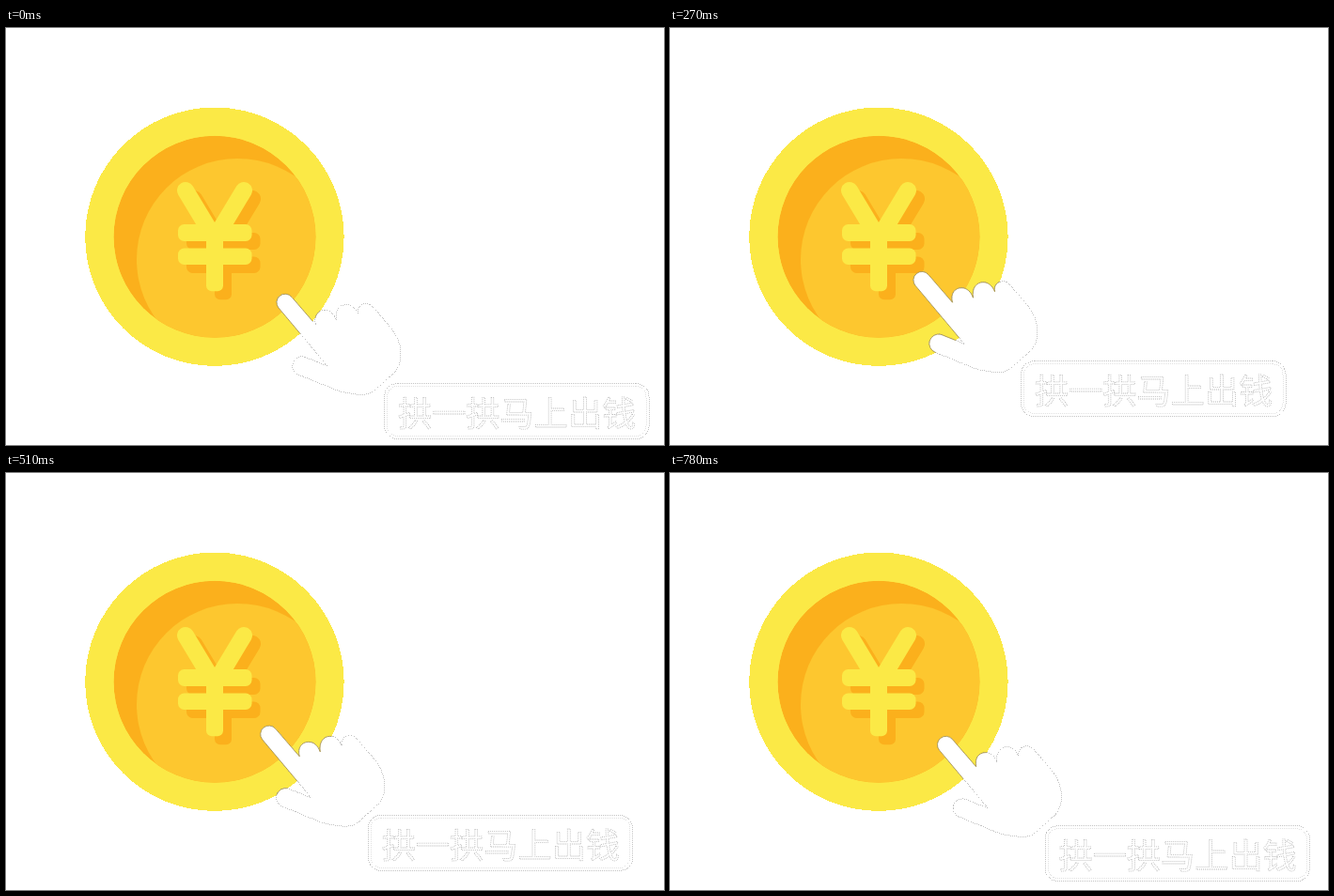
Write an HTML page that moves like this. It is 700 by 444 pixels and loops after 810 ms.

```html
<!DOCTYPE html>
<html lang="zh">
<head>
<meta charset="utf-8">
<style>
  html, body { margin: 0; width: 100%; height: 100%; overflow: hidden; background: #fff; }
  svg { display: block; width: 100vw; height: 100vh; }
  .dots { fill: none; stroke: #b4b4b4; stroke-width: .8; stroke-dasharray: 1 1; shape-rendering: crispEdges; }
  text { font: 500 36.2px "Noto Sans CJK SC", "Noto Sans CJK", sans-serif; }
</style>
</head>
<body>
<svg viewBox="0 0 700 444" xmlns="http://www.w3.org/2000/svg">
  <defs>
    <clipPath id="face"><circle cx="222" cy="222.3" r="107.5"/></clipPath>
    <clipPath id="rim"><circle cx="221.9" cy="222.2" r="137.7"/></clipPath>
    <g id="yen">
      <path d="M191 173 L222 224.5 L253 173" fill="none" stroke="currentColor"
            stroke-width="18" stroke-linecap="round" stroke-linejoin="round"/>
      <g fill="currentColor">
        <rect x="213" y="209" width="18" height="71.3" rx="6"/>
        <rect x="183" y="209" width="78.5" height="18" rx="6.5"/>
        <rect x="183" y="234.5" width="78.5" height="17.5" rx="6.5"/>
      </g>
    </g>
    <path id="hand" d="M290 298 A9 9 0 0 1 304 286.5 L329.5 316
      C327 306.5 332 300.5 339 300.5 C345 300.5 349 304.5 351.5 311
      C350 300.5 355 294.5 362 294.5 C368 294.5 372 298.5 374.5 304.5
      C373 297.5 378 293.5 383 293.5 C386 293.5 388 294.5 390.5 297
      L410 320 C416 328 420 337 420 347 C420 355 418 362 413 367
      L393 385 C388 390 381 391 373 390 C365 389 358 388 350 385
      L311 369 A10 10 0 0 1 317 350 L342 360 Z"/>
  </defs>

  <circle cx="221.9" cy="222.2" r="137.7" fill="#fbe946" shape-rendering="crispEdges"/>
  <g clip-path="url(#face)">
    <circle cx="222" cy="222.3" r="107.5" fill="#fbb01c"/>
    <circle cx="246.5" cy="246.5" r="107.5" fill="#fdc72f"/>
  </g>
  <use href="#yen" x="9" y="9" color="#fbb01c"/>
  <use href="#yen" color="#fbe946"/>

  <g class="move">
    <use href="#hand" fill="#fff"/>
    <use href="#hand" class="dots"/>
    <rect class="dots" x="402.5" y="378.5" width="281.5" height="59" rx="14"/>
    <rect class="dots" x="405.5" y="381.5" width="275.5" height="53" rx="11" opacity=".5"/>
    <text class="dots" x="417" y="424">拱一拱马上出钱</text>
  </g>
  <g clip-path="url(#rim)">
    <g class="move">
      <use href="#hand" fill="#fff" stroke="#a08a3c" stroke-width=".8"/>
    </g>
  </g>
</svg>
<script>
  const LOOP = 810, STEP = 30, REACH = 29, PEAK = 8;
  const movers = document.querySelectorAll('.move');
  // way back: [step, distance left]
  const back = [[PEAK, REACH], [14, 20], [18, 14.5], [22, 9], [25, 3.5]];

  function pull(i) {
    if (i <= PEAK) return REACH * (i / PEAK) ** 1.475;
    const k = back.findIndex(p => p[0] >= i);
    const [a, u] = back[k - 1], [b, v] = back[k];
    return u + (v - u) * (i - a) / (b - a);
  }

  function draw(ms) {
    const step = Math.max(0, Math.floor(ms % LOOP / STEP) - 1);
    const d = pull(step);
    for (const m of movers) m.setAttribute('transform', `translate(${-d} ${-d * .82})`);
  }

  const start = performance.now();
  function tick() {
    draw(performance.now() - start);
    requestAnimationFrame(tick);
  }
  draw(0);
  requestAnimationFrame(tick);
</script>
</body>
</html>
```
